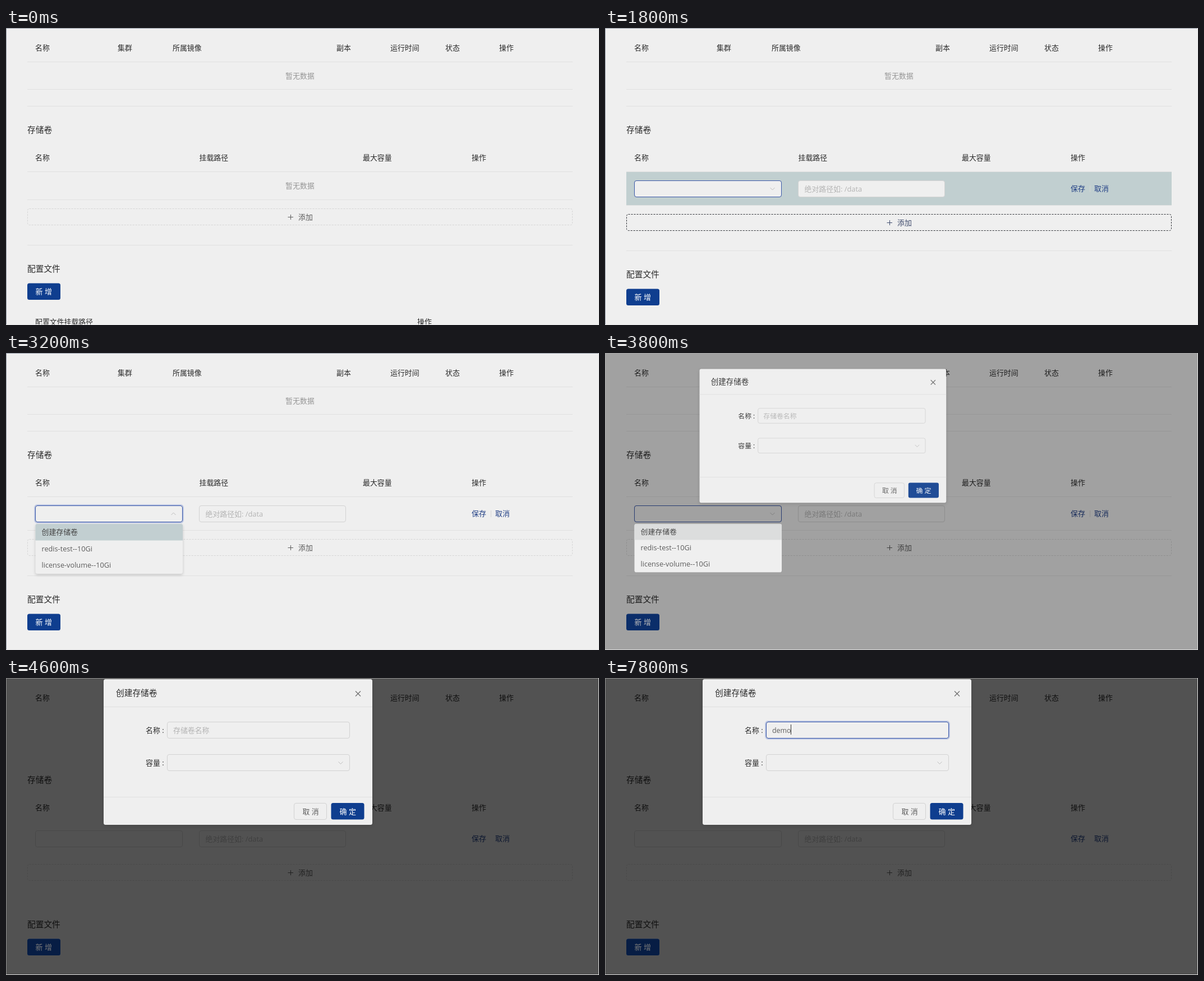
These frames come from a looping animation (1057 by 530 pixels, 8000 ms). An HTML page with a canvas:

```html
<!DOCTYPE html>
<html lang="zh-CN">
<head>
<meta charset="utf-8">
<title>存储卷</title>
<style>
html, body { margin: 0; width: 100%; height: 100%; overflow: hidden; background: #efefef; }
canvas { display: block; width: 1057px; height: 530px; }
</style>
</head>
<body>
<canvas id="stage" width="1057" height="530"></canvas>
<script>
const ctx = document.getElementById('stage').getContext('2d');
const LOOP = 8000, STEP = 200;
const BG = '#efefef', INK = '#2b2b2b', SOFT = '#5c5c5c', HINT = '#b4b4b4';
const LINE = '#e0e0e0', EDGE = '#d2d2d2', NAVY = '#0f3e8f', FOCUS = '#3a58a8', LINK = '#213f85';
const FONT = '"Open Sans", "Noto Sans CJK SC", "Noto Sans CJK", sans-serif';

const ramp = (t, a, b) => Math.min(1, Math.max(0, (t - a) / (b - a)));
const between = (t, a, b) => t >= a && t < b;

function withAlpha(alpha, draw) {
  if (alpha <= 0) return;
  ctx.save();
  ctx.globalAlpha *= alpha;
  draw();
  ctx.restore();
}

// y is the middle of the line of text
function text(str, x, y, color = INK, size = 12.9, weight = 400) {
  ctx.font = `${weight} ${size}px ${FONT}`;
  ctx.fillStyle = color;
  ctx.fillText(str, x, y + size * 0.34);
}

function rule(y, x = 38, w = 972) {
  ctx.fillStyle = LINE;
  ctx.fillRect(x, y, w, 1);
}

function box(x, y, w, h, fill, stroke, r = 3.5) {
  ctx.beginPath();
  ctx.roundRect(x, y, w, h, r);
  if (fill) { ctx.fillStyle = fill; ctx.fill(); }
  if (stroke) { ctx.strokeStyle = stroke; ctx.lineWidth = 1; ctx.stroke(); }
}

function path(points, color, width = 1) {
  ctx.beginPath();
  points.forEach(([x, y]) => ctx.lineTo(x, y));
  ctx.strokeStyle = color;
  ctx.lineWidth = width;
  ctx.stroke();
}

function chevron(x, y, dir = 1) {
  path([[x - 4, y - 2 * dir], [x, y + 2 * dir], [x + 4, y - 2 * dir]], '#bdbdbd');
}

function field(x, y, w, blue = 0, glow = 0) {
  const h = 29;
  withAlpha(glow, () => {
    box(x - 2, y - 2, w + 4, h + 4, null, 'rgba(70,105,200,.25)', 5);
    box(x - 1, y - 1, w + 2, h + 2, null, 'rgba(70,105,200,.35)', 4);
  });
  box(x, y, w, h, BG, EDGE);
  withAlpha(blue, () => box(x, y, w, h, null, FOCUS));
}

function shadowBox(x, y, w, h, blur, alpha) {
  ctx.save();
  ctx.shadowColor = `rgba(0,0,0,${alpha})`;
  ctx.shadowBlur = blur;
  ctx.shadowOffsetY = 2;
  box(x, y, w, h, BG);
  ctx.restore();
}

function addButton(y, hover, wave) {
  withAlpha(wave, () => box(37.5, y - 0.5, 973, 31, null, 'rgba(40,70,150,.35)', 5));
  const face = (main, edge) => {
    ctx.setLineDash([3, 2]);
    box(38.5, y + 0.5, 971, 29, null, edge, 3);
    ctx.setLineDash([]);
    path([[502.5, y + 15.5], [512, y + 15.5]], main);
    path([[507.5, y + 11], [507.5, y + 20]], main);
    text('添加', 521, y + 16, main);
  };
  withAlpha(1 - hover, () => face(SOFT, '#d5d5d5'));
  withAlpha(hover, () => face('#3e4a6c', '#303338'));
}

function newRow(t, dark) {
  const hover = ramp(t, 1400, 1800) - ramp(t, 2400, 3000);
  withAlpha(hover, () => {
    ctx.fillStyle = '#c1cfd0';
    ctx.fillRect(38, 257, 972, 60);
  });
  const blue = t < 4000 ? ramp(t, 1400, 1800) : 0;
  const open = between(t, 2600, 3800);
  field(52.5, 272.5, 262, blue, open ? 1 : 0);
  if (!dark) chevron(298.5, 287, open ? -1 : 1);
  field(344.5, 272.5, 261);
  text('绝对路径如: /data', 355.5, 288, HINT);
  text('保存', 830, 287, LINK);
  text('取消', 872, 287, LINK);
  if (!dark) {
    ctx.fillStyle = '#d4d4d4';
    ctx.fillRect(864, 281, 1, 12);
    rule(316);
  }
}

function page(t, dark) {
  const added = t >= 800, shift = added ? 10 : 0;
  [['名称', 52], ['集群', 199], ['所属镜像', 297], ['副本', 589], ['运行时间', 685],
   ['状态', 783], ['操作', 879]].forEach(([s, x]) => text(s, x, 36));
  if (!dark) [60, 109, 139, 256, 387 + shift].forEach(y => rule(y));
  text('暂无数据', 498, 86, '#969696');
  text('存储卷', 38, 182, INK, 14.7);
  [['名称', 52], ['挂载路径', 344.5], ['最大容量', 636], ['操作', 830]]
    .forEach(([s, x]) => text(s, x, 232));
  if (added) {
    newRow(t, dark);
  } else {
    text('暂无数据', 498, 282, '#969696');
    rule(306);
  }
  const wave = added ? 1 - ramp(t, 800, 1400) : 0;
  addButton(322 + shift, t < 2600 ? ramp(t, 200, 600) : 0, wave);
  text('配置文件', 38, 430 + shift, INK, 14.7);
  if (!added) {
    text('配置文件挂载路径', 52, 524.5);
    text('操作', 733, 524.5);
  }
}

function newButton(y, shade) {
  box(38, y, 59, 29.5, NAVY);
  text('新 增', 52.5, y + 15.5, '#fff', 13, 500);
  withAlpha(shade * 0.8, () => box(38, y, 59, 29.5, '#000'));
}

function dropdown(t) {
  if (!between(t, 2600, 4000)) return;
  const closing = t >= 3800, grow = ramp(t, 2600, 3000);
  withAlpha(closing ? 1 : 0.6 + 0.4 * grow, () => {
    ctx.translate(0, 305);
    ctx.scale(1, closing ? 0.97 : 0.85 + 0.15 * grow);
    ctx.translate(0, -305);
    shadowBox(52.5, 305, 262.5, 89, 5, closing ? 0 : 0.18);
    box(52.5, 305, 262.5, 29.5, closing ? '#dcdddd' : '#c2cfd1', null, [3, 3, 0, 0]);
    text('创建存储卷', 63.5, 320, '#444');
    text('redis-test--10Gi', 63.5, 349.5, SOFT, 12.7);
    text('license-volume--10Gi', 63.5, 379, SOFT, 12.7);
  });
}

function nameField(t) {
  const focus = ramp(t, 5000, 5400);
  field(287.5, 78.5, 325, focus, focus);
  const typed = 'demo'.slice(0, t < 7200 ? 0 : t < 7400 ? 1 : t < 7800 ? 2 : 4);
  if (typed) text(typed, 298, 93.5, SOFT, 12.4);
  else text('存储卷名称', 298, 93.5, HINT);
  if (between(t, 5200, 5800) || between(t, 6400, 6800) || t >= 7200) {
    ctx.font = `400 12.4px ${FONT}`;
    const x = 298 + Math.floor(ctx.measureText(typed).width);
    ctx.fillStyle = '#333';
    ctx.fillRect(x, 83, 1, 18);
  }
}

function dialog(t) {
  if (t < 3800) return;
  const opening = t < 4000;
  ctx.save();
  if (opening) {
    ctx.translate(168.5, 28.5);
    ctx.scale(0.918, 0.918);
    ctx.translate(-174, -2);
  }
  shadowBox(174, 2, 479, 260, 6, 0.12);
  withAlpha(opening ? 0.92 : 1, () => {
    text('创建存储卷', 196, 27.5, INK, 14.7);
    path([[623, 23.5], [632, 32.5]], '#707070', 1.3);
    path([[632, 23.5], [623, 32.5]], '#707070', 1.3);
    rule(51, 174, 479);
    text('名称 :', 249, 93.5);
    nameField(t);
    text('容量 :', 249, 151.5);
    field(287.5, 136.5, 325);
    chevron(596.5, 151.5);
    rule(212, 174, 479);
    box(513.5, 223.5, 58, 29, BG, EDGE);
    text('取 消', 528.5, 239, SOFT);
    box(579.5, 223, 59, 29.5, NAVY);
    text('确 定', 594.5, 239, '#fff', 13, 500);
  });
  ctx.restore();
}

function frameEdges(shade) {
  ctx.fillStyle = shade > 0.5 ? '#8e8e8e' : shade > 0 ? '#a8a8a8' : '#8d949f';
  ctx.fillRect(0, 0, 1057, 1);
  ctx.fillRect(0, 0, 1, 530);
  ctx.fillStyle = shade > 0 ? '#dedede' : '#e6e6e8';
  ctx.fillRect(1056, 0, 1, 530);
  ctx.fillRect(0, 529, 1057, 1);
}

function render(t) {
  const shade = t < 3800 ? 0 : t < 4000 ? 0.33 : 0.655;
  ctx.fillStyle = BG;
  ctx.fillRect(0, 0, 1057, 530);
  page(t, t >= 4000);
  ctx.fillStyle = `rgba(0,0,0,${shade})`;
  ctx.fillRect(0, 0, 1057, 530);
  newButton(t >= 800 ? 465.5 : 455.5, shade);
  frameEdges(shade);
  dropdown(t);
  dialog(t);
}

const start = performance.now();
function tick() {
  const t = (performance.now() - start) % LOOP;
  render(Math.floor(t / STEP) * STEP);
  requestAnimationFrame(tick);
}
tick();
</script>
</body>
</html>
```
